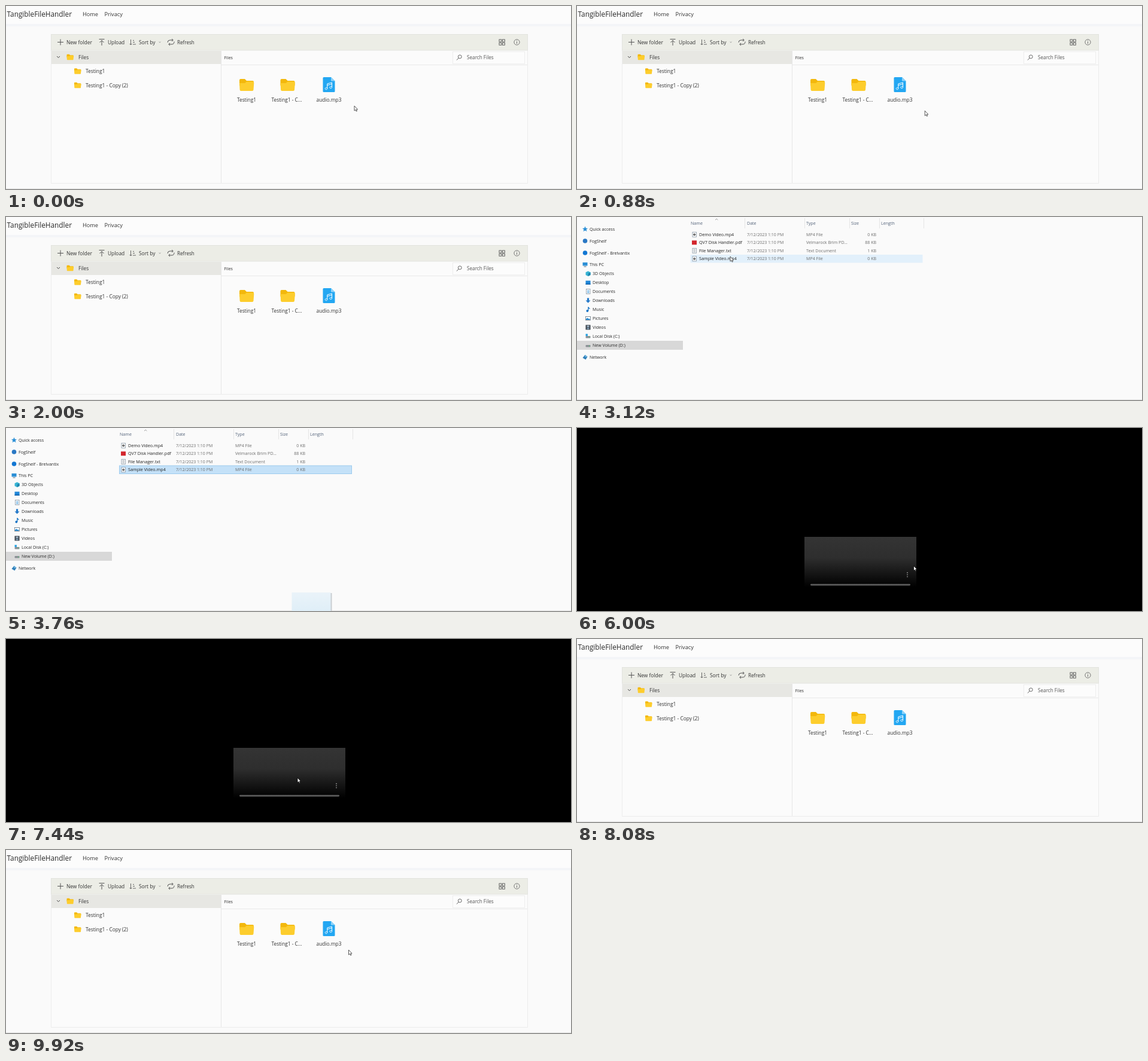
Write an HTML page that moves like this. It is 944 px wide and 306 px high and loops after 10 s.

```html
<!DOCTYPE html>
<html lang="en">
<head>
<meta charset="utf-8">
<title>File upload</title>
<style>
  html, body { margin: 0; width: 100%; height: 100%; overflow: hidden; background: #fafafa; }
  svg { display: block; width: 944px; height: 306px; font-family: "Open Sans", "Noto Sans", sans-serif; }
</style>
</head>
<body>
<svg id="stage" viewBox="0 0 944 306"></svg>
<script>
const LOOP = 10000, STEP = 80;

// Markup helpers
const rect = (x, y, w, h, fill, more = '') =>
  `<rect x="${x}" y="${y}" width="${w}" height="${h}" fill="${fill}" ${more}/>`;
const text = (x, y, size, str, fill = '#333', anchor = 'start') =>
  `<text x="${x}" y="${y}" font-size="${size}" fill="${fill}" text-anchor="${anchor}">${str}</text>`;
const line = (d, color = '#555', width = 1) =>
  `<path d="${d}" fill="none" stroke="${color}" stroke-width="${width}"/>`;
const shape = (d, fill) => `<path d="${d}" fill="${fill}"/>`;
const dot = (x, y, r, fill) => `<circle cx="${x}" cy="${y}" r="${r}" fill="${fill}"/>`;
const at = (x, y, body, scale = 1) => `<g transform="translate(${x} ${y}) scale(${scale})">${body}</g>`;

const folder = (x, y, scale) => at(x, y,
  shape('M0 3Q0 1 2 1H9L12 4H22Q24 4 24 6V12H0Z', '#f3b80c') +
  shape('M0 8H9L12 5.5H22.5Q24.5 5.5 24.3 8L23.5 19Q23.3 21 21.5 21H2.5Q.8 21 .6 19Z', '#fdcd2d'), scale);

function managerPage() {
  const toolbar =
    line('M91 55.5V65.5M86 60.5H96') + text(101, 64, 8.4, 'New folder') +
    line('M155.5 55.5H164.5M160 66V57.5M156.5 61L160 57.5L163.5 61') + text(170, 64, 8.4, 'Upload') +
    line('M208.5 56V65M206.5 63L208.5 65L210.5 63M212 57.5H214M212 60.5H215M212 64H217', '#555', .9) +
    text(222, 64, 8.4, 'Sort by') + line('M255.5 59.8L257 61.2L258.5 59.8', '#888', .8) +
    line('M270 61Q270 57 274 57H279M277 55L279.3 57L277 59M281 59.5Q281 64 277 64H272M274 62L271.7 64L274 66') +
    text(286, 64, 8.1, 'Refresh') +
    [[824, 56], [829.5, 56], [824, 61.5], [829.5, 61.5]]
      .map(([x, y]) => rect(x, y, 3.8, 3.8, 'none', 'stroke="#555" stroke-width=".9"')).join('') +
    '<circle cx="853.5" cy="60.5" r="4.6" fill="none" stroke="#666" stroke-width=".9"/>' +
    line('M853.5 59.8V63M853.5 57.8V58.8', '#666');
  const audio =
    shape('M531 119H543L549.5 125.5V142.5Q549.5 144 548 144H531Q529.5 144 529.5 142.5V120.5Q529.5 119 531 119Z', '#23a7f2') +
    shape('M543 119L549.5 125.5H543Z', '#8ed3fa') +
    line('M536.8 138V130L544.5 128V136M536.8 132.5L544.5 130.5', '#fff', 1) +
    line('M536.8 138A1.8 1.6 0 1 1 536.7 137.6M544.5 136A1.8 1.6 0 1 1 544.4 135.6', '#fff', .9);
  return rect(0, 0, 944, 306, '#fafafa') + rect(0, 0, 944, 30, '#fcfcfc') + rect(0, 30, 944, 4, '#f4f5f8') +
    text(1.5, 18, 11.8, 'TangibleFileHandler', '#2b2b2b') +
    text(128, 17, 9.2, 'Home') + text(164.5, 17, 9.2, 'Privacy') +
    rect(75.5, 47.5, 796, 249, '#fbfbfb', 'stroke="#ececec"') +
    rect(75.5, 47.5, 796, 26.5, '#ecede6', 'stroke="#e2e3de"') + toolbar +
    rect(76, 75, 283, 22, '#e7e7e3') + line('M359.5 75V296', '#e6e6e6') + line('M360 98.5H871', '#e9e9e9') +
    line('M85 84L87.5 86.5L90 84', '#444') +
    folder(101.5, 80.3, .47) + text(121, 88.8, 8.3, 'Files') +
    folder(114, 103.8, .47) + text(133, 112.3, 8.4, 'Testing1') +
    folder(114, 127.3, .47) + text(133, 136, 8.4, 'Testing1 - Copy (2)') +
    text(364.5, 89, 7, 'Files') + rect(746.5, 76.5, 120, 20, '#fcfcfc', 'stroke="#eeeeee"') +
    '<circle cx="758.3" cy="84.8" r="2.9" fill="none" stroke="#555" stroke-width=".9"/>' +
    line('M756.2 87L753 90.5', '#555', .9) + text(770, 89.3, 8.2, 'Search Files', '#555') +
    folder(390, 121, 1) + folder(458.5, 121, 1) + audio +
    text(402, 159.8, 8.3, 'Testing1', '#333', 'middle') +
    text(469, 159.8, 8.3, 'Testing1 - C...', '#333', 'middle') +
    text(539.5, 159.8, 8.4, 'audio.mp3', '#333', 'middle') +
    line('M0 305.5H944', '#e4e4e4');
}

function explorerPage() {
  const blue = '#2b8fd6', drive = rect(-4, -.5, 8, 3.5, '#8b9096', 'rx="1"') + dot(2.3, 1.3, .7, '#4ddc6b');
  const screen = rect(-4, -3.5, 8, 5.5, blue) + rect(-2, 3, 4, 1, '#5d6b78');
  const sheet = rect(-3, -4, 6.5, 8, '#fff', 'stroke="#8796a3" stroke-width=".8"');
  const places = [
    [20, 0, 'Quick access', shape('M0 -4.5L1.3 -1.3L4.5 -1L2 1L3 4.2L0 2.4L-3 4.2L-2 1L-4.5 -1L-1.3 -1.3Z', blue)],
    [40, 0, 'FogShelf', dot(0, 0, 3.8, '#2a78c4')],
    [60, 0, 'FogShelf - Brelvantix', dot(0, 0, 3.8, '#1277d3')],
    [79.5, 0, 'This PC', screen],
    [94.5, 5, '3D Objects', shape('M0 -4L4 -2V2.5L0 4.5L-4 2.5V-2Z', '#37b3d3') + shape('M0 0L4 -2V2.5L0 4.5Z', '#1d85ad')],
    [109.5, 5, 'Desktop', rect(-4, -3, 8, 6.5, '#1f86d8') + rect(-4, 2, 8, 1.5, '#0f5fa6')],
    [124.5, 5, 'Documents', sheet + line('M-1.5 -1.5H2M-1.5 .3H2M-1.5 2H2', blue, .8)],
    [139.5, 5, 'Downloads', shape('M-1.6 -4H1.6V0H4L0 4.3L-4 0H-1.6Z', '#2479c9')],
    [154.5, 5, 'Music', line('M.3 2.5V-4Q1 -2 3 -1', '#1673c5', 1.3) + dot(-1.2, 2.5, 1.9, '#1673c5')],
    [169.5, 5, 'Pictures', rect(-4, -3, 8, 6, '#fff', 'stroke="#66747f" stroke-width=".8"') + shape('M-3.5 2.5V1L-1 -1L1 1L2 0L3.5 2.5Z', blue)],
    [184.5, 5, 'Videos', rect(-4, -4, 8, 8, '#3b434c') + rect(-2, -3, 4, 2.7, '#9fb5c7') + rect(-2, .5, 4, 2.7, '#7893a8')],
    [199.5, 5, 'Local Disk (C:)', drive + rect(-4, -4, 3.4, 3.4, '#21a0e2')],
    [214.5, 5, 'New Volume (D:)', drive],
    [234.5, 0, 'Network', shape('M0 -4L4 -1L1 4L-4 1Z', '#2f7fb9') + shape('M0 -4L4 -1L0 0Z', '#77bce4')]
  ];
  const files = [
    ['Demo Video.mp4', 'MP4 File', '0 KB'],
    ['QV7 Disk Handler.pdf', 'Velmarock Brim PD...', '88 KB'],
    ['File Manager.txt', 'Text Document', '1 KB'],
    ['Sample Video.mp4', 'MP4 File', '0 KB']
  ];
  const fileIcon = name => name.endsWith('pdf') ? rect(-4, -3.5, 8, 7, '#d3262d')
    : sheet + (name.endsWith('txt') ? line('M-1.5 -2H2M-1.5 0H2M-1.5 2H2', '#8a939b', .8) : dot(.2, 0, 1.9, '#4a4a4a') + dot(.2, 0, .7, '#ddd'));
  const heads = [[190, 'Name'], [284, 'Date'], [383, 'Type'], [458, 'Size'], [508, 'Length']];
  return rect(0, 0, 944, 306, '#fafafa') + rect(0, 207, 177, 15, '#d8d8d8') +
    places.map(([y, dx, name, icon]) => at(13.5 + dx, y, icon) + text(21 + dx, y + 2.6, 7.1, name, '#2a2a2a')).join('') +
    heads.map(([x, name]) => text(x, 13, 7.1, name, '#54637a')).join('') +
    [280, 380, 455, 505, 579].map(x => line(`M${x}.5 2V19`, '#e5e5e5')).join('') +
    line('M231 5L233.2 3L235.4 5', '#888', .8) +
    '<rect id="row" x="189.5" y="63" width="388" height="13.5"/>' +
    files.map(([name, type, size], i) => {
      const y = 29.3 + i * 13.5;
      return at(196, y, fileIcon(name)) + text(204, y + 2.6, 7.2, name, '#222') +
        text(284, y + 2.6, 7, '7/12/2023 1:10 PM', '#6d6d6d') + text(383, y + 2.6, 7.1, type, '#6d6d6d') +
        text(500, y + 2.6, 7, size, '#6d6d6d', 'end');
    }).join('') +
    line('M0 305.5H944', '#e4e4e4');
}

function videoPage() {
  return rect(0, 0, 944, 306, '#000') + rect(380, 182, 187, 84, 'url(#shade)') +
    rect(390, 260.8, 167, 2.6, '#5c5c5c', 'rx="1.3"') +
    [242, 245.3, 248.6].map(y => dot(552, y, .9, '#999')).join('');
}

const stage = document.getElementById('stage');
stage.innerHTML = `<defs>
  <linearGradient id="shade" x2="0" y2="1">
    <stop offset="0" stop-color="#343434"/><stop offset=".42" stop-color="#2e2e2e"/>
    <stop offset=".72" stop-color="#161616"/><stop offset="1" stop-color="#000"/>
  </linearGradient>
  <linearGradient id="glass" x2="0" y2="1">
    <stop offset="0" stop-color="#eaf3f9"/><stop offset="1" stop-color="#d3e9f6"/>
  </linearGradient></defs>
  <g id="manager">${managerPage()}</g><g id="explorer">${explorerPage()}</g><g id="video">${videoPage()}</g>
  <g id="ghost">${rect(1, 1, 66, 66, '#c9ced2')}${rect(0, 0, 65, 66, 'url(#glass)')}</g>
  <path id="cursor" d="M0 0V8.2L1.9 6.5L3.2 9.2L4.5 8.6L3.2 6H5.6Z" fill="#fff" stroke="#333" stroke-width=".8"/>`;

const [manager, explorer, video, ghost, cursor, row] =
  ['manager', 'explorer', 'video', 'ghost', 'cursor', 'row'].map(id => document.getElementById(id));

const scenes = [[0, manager], [2080, explorer], [4320, manager], [5840, video], [8080, manager]];

// Pointer tip: time, x, y
const track = [
  [0, 582, 167], [480, 586, 172], [1040, 580, 176], [1200, 572, 188], [1680, 505, 320], [2080, 478, 320],
  [2160, 468, 266], [2800, 300, 92], [3040, 256, 66], [3360, 256, 66], [3760, 510, 335], [3920, 512, 400],
  [5280, 512, 400], [5360, 520, 355], [5680, 552, 234], [5840, 558, 228], [6000, 562.5, 230.5], [6160, 562.5, 230.5],
  [6720, 324, 12], [7200, 473, 224], [7440, 487, 232], [8000, 487, 232], [8080, 300, -14],
  [8880, 300, -14], [9200, 450, 96], [9520, 558, 208], [9920, 572.5, 167], [LOOP, 582, 167]
];

function pointerAt(t) {
  const i = track.findIndex(k => k[0] > t);
  const [t0, x0, y0] = track[i - 1], [t1, x1, y1] = track[i];
  const p = (t - t0) / (t1 - t0), e = p * p * (3 - 2 * p);
  return [x0 + (x1 - x0) * e, y0 + (y1 - y0) * e];
}

const show = (el, on) => el.setAttribute('visibility', on ? 'visible' : 'hidden');
const move = (el, x, y) => el.setAttribute('transform', `translate(${x} ${y})`);

function draw(time) {
  const t = Math.floor(time % LOOP / STEP) * STEP;
  const scene = scenes.filter(s => s[0] <= t).pop()[1];
  for (const g of [manager, explorer, video]) g.setAttribute('display', g === scene ? 'inline' : 'none');

  const [x, y] = pointerAt(t);
  move(cursor, x, y);
  move(ghost, x - 32.5, y - 60);
  show(ghost, t > 3360 && t < 5760);
  cursor.setAttribute('stroke', scene === video ? '#000' : '#333');

  const picked = t >= 3200;
  row.setAttribute('fill', picked ? '#c4e1f8' : t >= 2960 ? '#e2f0fb' : 'none');
  row.setAttribute('stroke', picked ? '#9dcbee' : 'none');
}

const start = performance.now();
function tick() {
  draw(performance.now() - start);
  requestAnimationFrame(tick);
}
tick();
</script>
</body>
</html>
```
